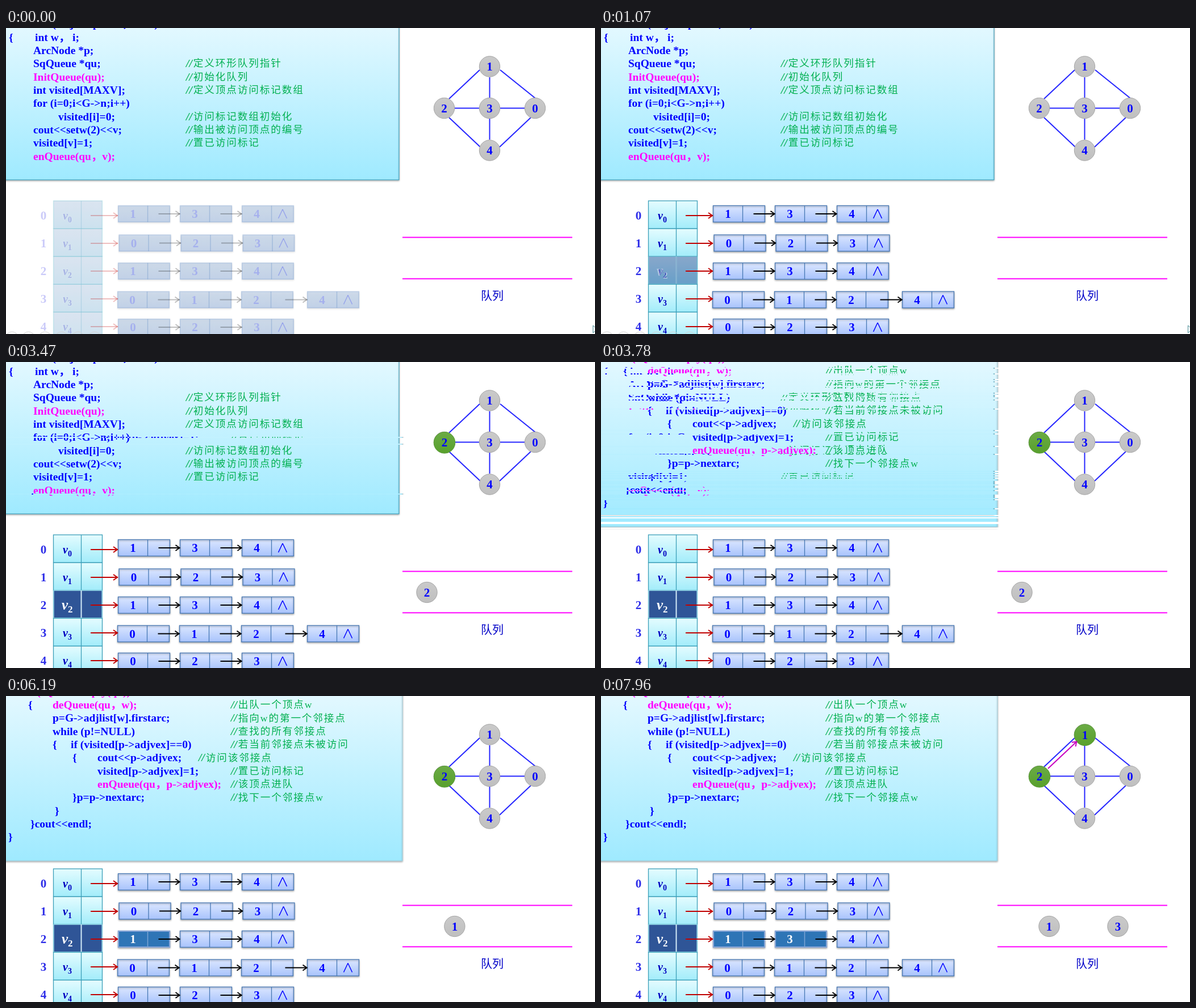
An HTML page with a canvas that plays this animation: 1037 by 540 pixels, repeating every 8 s.

```html
<!DOCTYPE html>
<html lang="zh">
<head>
<meta charset="utf-8">
<style>
html, body { margin: 0; width: 100%; height: 100%; overflow: hidden; background: #fff; }
canvas { display: block; }
</style>
</head>
<body>
<canvas id="stage" width="1037" height="540"></canvas>
<script>
const ctx = document.getElementById('stage').getContext('2d');
const LOOP = 8000;
const BLUE = '#0000ff', PINK = '#ff00ff', GREEN = '#00b050', MAGENTA = '#ff00ff';
const SERIF = '"Liberation Serif", "Noto Sans CJK SC", serif';

// Each line: [row, x, text, colour]; each note: [row, x, text]
const setup = {
  right: 692, bottom: 268, base: -0.8, edge: '#2f9cbc',
  lines: [
    [0, 5, 'void BFS(AdjGraph *G，int v)'], [1, 5, '{'], [1, 51, 'int w， i;'],
    [2, 48, 'ArcNode *p;'], [3, 48, 'SqQueue *qu;'], [4, 48, 'InitQueue(qu);', PINK],
    [5, 48, 'int visited[MAXV];'], [6, 48, 'for (i=0;i<G->n;i++)'], [7, 92, 'visited[i]=0;'],
    [8, 48, 'cout<<setw(2)<<v;'], [9, 48, 'visited[v]=1;'], [10, 48, 'enQueue(qu，v);', PINK]
  ],
  notes: [
    [3, 316, '定义环形队列指针'], [4, 316, '初始化队列'], [5, 316, '定义顶点访问标记数组'],
    [7, 316, '访问标记数组初始化'], [8, 316, '输出被访问顶点的编号'], [9, 316, '置已访问标记']
  ]
};
const search = {
  right: 698, bottom: 291, base: -1.3, edge: '#a4cfdc',
  lines: [
    [0, 5, 'while (!QueueEmpty(qu))', PINK], [1, 39, '{'], [1, 82, 'deQueue(qu，w);', PINK],
    [2, 82, 'p=G->adjlist[w].firstarc;'], [3, 82, 'while (p!=NULL)'],
    [4, 82, '{'], [4, 114, 'if (visited[p->adjvex]==0)'], [5, 117, '{'], [5, 161, 'cout<<p->adjvex;'],
    [6, 161, 'visited[p->adjvex]=1;'], [7, 161, 'enQueue(qu，p->adjvex);', PINK],
    [8, 117, '}p=p->nextarc;'], [9, 86, '}'], [10, 43, '}cout<<endl;'], [11, 4, '}']
  ],
  notes: [
    [1, 395, '出队一个顶点w'], [2, 395, '指向w的第一个邻接点'], [3, 395, '查找的所有邻接点'],
    [4, 395, '若当前邻接点未被访问'], [5, 338, '访问该邻接点'], [6, 395, '置已访问标记'],
    [7, 395, '该顶点进队'], [8, 395, '找下一个邻接点w']
  ]
};
// Adjacency rows: red arrow y, list centre y, list x, neighbours
const rows = [
  [331, 328, 197.5, '134'], [380, 379.5, 199, '023'], [429, 429, 197.5, '134'],
  [478, 479.5, 196.5, '0124'], [527, 528, 197.5, '023']
];
const vertices = [[931.5, 141.5], [851.5, 68], [771.5, 141.5], [851.5, 141.5], [851.5, 216]];
const edges = [
  [780, 125, 834, 74], [870, 74, 932, 124], [780, 158, 835, 210], [869, 210, 924, 158],
  [851.5, 87, 851.5, 123], [851.5, 160, 851.5, 197], [790, 141.5, 833, 141.5], [870, 141.5, 913, 141.5]
];

// Progress 0..1 in n equal steps, the first at start and the last at end
function steps(t, start, end, n) {
  const k = Math.floor((t - start) / (end - start) * (n - 1) + 0.1) + 1;
  return Math.max(0, Math.min(n, k)) / n;
}

function text(s, x, y, size, color, align = 'left', style = 'bold') {
  ctx.font = `${style} ${size}px ${SERIF}`;
  ctx.textAlign = align;
  ctx.fillStyle = color;
  ctx.fillText(s, x, y);
}

function line(x1, y1, x2, y2, color, width = 2) {
  ctx.strokeStyle = color;
  ctx.lineWidth = width;
  ctx.beginPath();
  ctx.moveTo(x1, y1);
  ctx.lineTo(x2, y2);
  ctx.stroke();
}

function arrow(x1, y1, x2, y2, color) {
  line(x1, y1, x2, y2, color);
  ctx.save();
  ctx.translate(x2, y2);
  ctx.rotate(Math.atan2(y2 - y1, x2 - x1));
  ctx.lineJoin = 'miter';
  ctx.beginPath();
  ctx.moveTo(-8, -5);
  ctx.lineTo(-1, 0);
  ctx.lineTo(-8, 5);
  ctx.stroke();
  ctx.restore();
}

function gradient(y1, y2, top, bottom) {
  const g = ctx.createLinearGradient(0, y1, 0, y2);
  g.addColorStop(0, top);
  g.addColorStop(1, bottom);
  return g;
}

function box(x, y, w, h, fill, stroke, width = 1.3) {
  ctx.fillStyle = fill;
  ctx.fillRect(x, y, w, h);
  ctx.strokeStyle = stroke;
  ctx.lineWidth = width;
  ctx.strokeRect(x, y, w, h);
}

function withShadow(draw) {
  ctx.save();
  ctx.shadowColor = 'rgba(0,0,0,.3)';
  ctx.shadowBlur = 3;
  ctx.shadowOffsetY = 1.5;
  draw();
  ctx.restore();
}

function faded(alpha, draw) {
  if (alpha <= 0) return;
  ctx.save();
  ctx.globalAlpha = alpha;
  draw();
  ctx.restore();
}

function panel({ right, bottom, base, edge, lines, notes }) {
  withShadow(() => box(-5, -5, right + 5, bottom + 5, gradient(0, bottom, '#e2f8ff', '#9feaff'), edge, 1));
  const baseline = row => base + row * 23.33;
  for (const [row, x, s, color = BLUE] of lines) text(s, x, baseline(row), 19.5, color);
  for (const [row, x, s] of notes) {
    text('//', x + 1, baseline(row), 19.5, GREEN, 'left', 'italic bold');
    ctx.letterSpacing = '1.9px';
    text(s, x + 13.8, baseline(row) - 0.7, 17.6, GREEN, 'left', '500');
    ctx.letterSpacing = '0px';
  }
}

// Reveal the second panel through thin bars in random order
function bars(progress) {
  if (!progress) return;
  const share = progress * progress * (3 - 2 * progress);
  let seed = 20117;
  ctx.save();
  ctx.beginPath();
  for (let y = 0; y < 296; y += 2) {
    seed = seed * 16807 % 2147483647;
    if (seed / 2147483647 < share) ctx.rect(0, y, 702, 2);
  }
  ctx.clip();
  ctx.fillStyle = '#fff';
  ctx.fillRect(0, 0, 702, 296);
  panel(search);
  ctx.restore();
}

function disc(x, y, label, green = false) {
  const r = green ? 18.8 : 18.2;
  ctx.beginPath();
  ctx.arc(x, y, r, 0, 7);
  ctx.fillStyle = green ? gradient(y - r, y + r, '#6bab45', '#58a02c') : gradient(y - r, y + r, '#cacaca', '#bfbfbf');
  ctx.fill();
  ctx.strokeStyle = green ? '#5a9a38' : '#a5a5a5';
  ctx.lineWidth = 1;
  ctx.stroke();
  text(label, x, y + 7, 21, BLUE, 'center');
}

function graph(t) {
  for (const e of edges) line(...e, '#2626ff');
  vertices.forEach(([x, y], i) => disc(x, y, i));
  const visit = i => disc(vertices[i][0] + 0.5, vertices[i][1] + 0.8, i, true);
  faded(steps(t, 2710, 3240, 8), () => visit(2));
  if (t >= 7030) visit(1);
  const wipe = steps(t, 6490, 6880, 6);
  ctx.save();
  ctx.beginPath();
  ctx.rect(785, 70, 57 * wipe, 62);
  ctx.clip();
  arrow(787, 128, 838, 80, '#c800c0');
  ctx.restore();
}

function flyIn(t, start, gap, x, label) {
  if (t < start) return;
  const held = Math.floor((t - start) / gap + 0.1) * gap;
  const p = Math.min(1, (held + 50) / 300);
  disc(1056 + (x - 1056) * p, 406.5, label);
}

function queue(t) {
  line(698, 369.5, 997, 369.5, MAGENTA, 2.2);
  line(698, 442.5, 997, 442.5, MAGENTA, 2.2);
  text('队列', 856, 480, 20, '#0000c8', 'center', '500');
  faded(1 - steps(t, 4410, 4870, 7), () => flyIn(t, 2000, 83, 741, 2));
  flyIn(t, 5940, 83, 789, 1);
  flyIn(t, 7810, 75, 837, 3);
}

function headCell(i, dark) {
  const y = 305 + i * 49.1, cy = rows[i][0];
  box(83.5, y, 86, 49.1, gradient(y, y + 49, '#e4fcff', '#a2ecfa'), '#3c9fb8');
  line(132.5, y, 132.5, y + 49, '#3c9fb8', 1.3);
  text('v', 100, cy + 7, 20, '#0000c0', 'left', 'italic bold');
  text(i, 109, cy + 12, 14, '#0000c0');
  faded(dark, () => {
    box(84, y, 85, 48.5, '#2f5597', '#9fdcec');
    line(132.5, y, 132.5, y + 48, '#d4ecf8', 2);
    text('v', 98, cy + 8, 25, '#fff', 'left', 'italic bold');
    text(i, 109, cy + 13, 17, '#fff');
  });
}

function listCell(x, cy, label, last, dark) {
  const y = cy - 14.5;
  withShadow(() => box(x, y, 91, 29, gradient(y, y + 29, '#dce7ff', '#a8c3fc'), '#4778b4'));
  line(x + 52, y, x + 52, y + 29, '#4778b4', 1.3);
  text(label, x + 26, cy + 7, 21, BLUE, 'center');
  if (last) {
    line(x + 64, cy + 8, x + 71.5, cy - 8, BLUE, 1.5);
    line(x + 71.5, cy - 8, x + 79, cy + 8, BLUE, 1.5);
  }
  faded(dark, () => {
    box(x + 0.5, y + 0.5, 90, 28, '#2e75b6', '#86a5d8', 2);
    line(x + 52, y, x + 52, y + 29, '#7da4d4', 1.5);
    text(label, x + 26, cy + 7, 21, '#fff', 'center');
  });
}

function adjacency(t) {
  const shown = 0.25 + 0.75 * steps(t, 60, 230, 3);
  const ghost = (1 - shown) * 0.2;
  const headDark = steps(t, 840, 1390, 8);
  const listDark = [steps(t, 5250, 5710, 7), steps(t, 7180, 7650, 7)];
  faded(shown, () => rows.forEach(([headY, listY, x0, labels], i) => {
    const cellX = j => x0 + (j < 3 ? j * 109 : 334);
    text(i, 66, headY + 7, 21, '#2c2ce8', 'center');
    headCell(i, Math.max(ghost, i === 2 ? headDark : 0));
    [...labels].forEach((label, j) => {
      const dark = i === 2 && listDark[j] || 0;
      listCell(cellX(j), listY, label, j === labels.length - 1, Math.max(ghost, dark));
    });
    for (let j = 1; j < labels.length; j++) {
      arrow(cellX(j - 1) + (j < 3 ? 71 : 77), listY, cellX(j), listY, '#000');
    }
    arrow(149, headY, 197, headY, '#c00000');
  }));
}

function slideControls() {
  ctx.strokeStyle = '#d4d4d4';
  ctx.lineWidth = 1;
  for (let i = 0; i < 6; i++) {
    ctx.beginPath();
    ctx.arc(10.5 + i * 29.1, 547, 11, 0, 7);
    ctx.stroke();
  }
  ctx.strokeStyle = '#4a8c96';
  ctx.beginPath();
  ctx.moveTo(1040, 531);
  ctx.lineTo(1033.5, 525);
  ctx.lineTo(1033.5, 538);
  ctx.lineTo(1037, 535);
  ctx.stroke();
}

function frame() {
  const t = performance.now() % LOOP;
  ctx.fillStyle = '#fff';
  ctx.fillRect(0, 0, 1037, 540);
  const reveal = steps(t, 3470, 3930, 7);
  if (reveal < 1) panel(setup);
  bars(reveal);
  graph(t);
  queue(t);
  adjacency(t);
  if (t < 2000) slideControls();
  requestAnimationFrame(frame);
}
frame();
</script>
</body>
</html>
```
